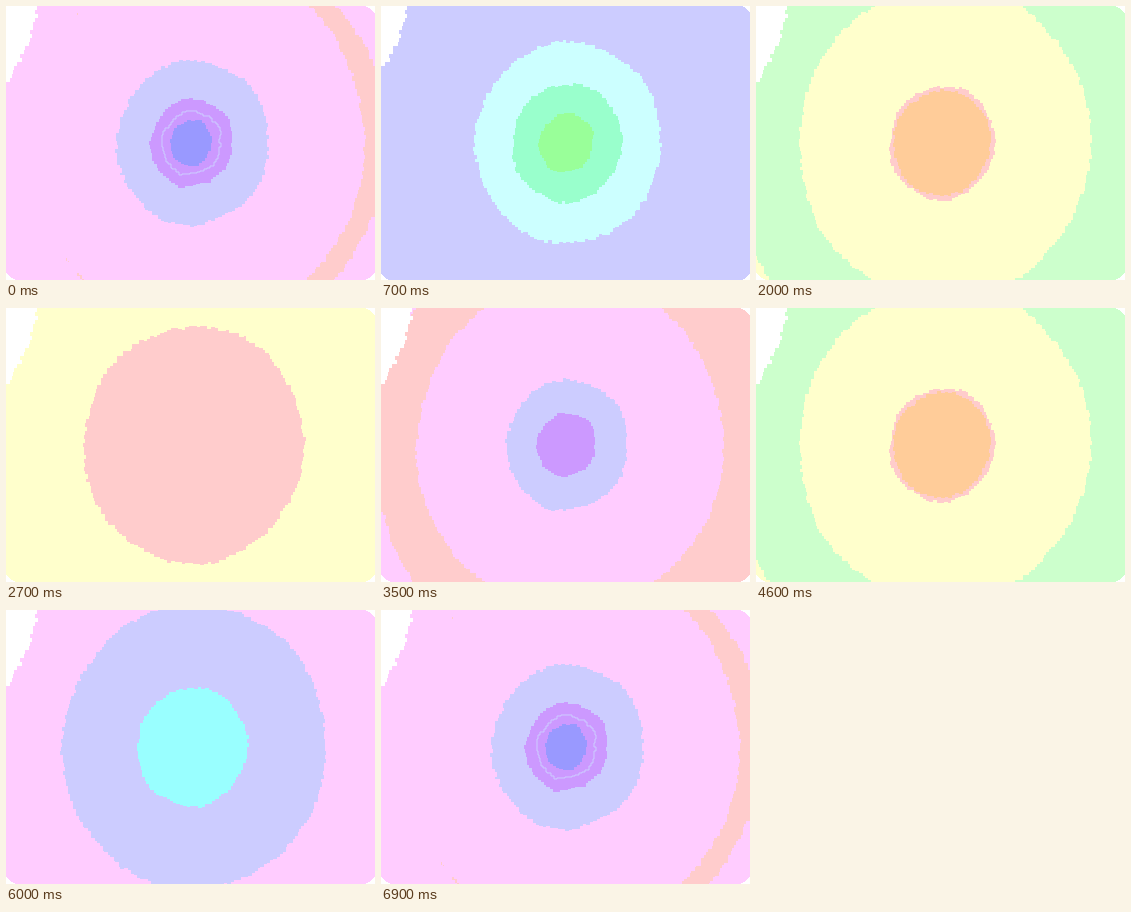
These frames come from a looping animation (369x274 px, 7 s). An HTML page with a canvas:

```html
<!DOCTYPE html>
<html>
<head>
<meta charset="utf-8">
<style>
html, body { margin: 0; width: 100%; height: 100%; overflow: hidden; background: #fff; }
canvas { display: block; width: 369px; height: 274px; }
</style>
</head>
<body>
<canvas id="stage" width="369" height="274"></canvas>
<script>
const W = 369, H = 274, LOOP = 7000, STEP = 100;
const REACH = 110;      // hue span from the centre to the outermost ring
const PX_PER_DEG = 1.55;
const ctx = document.getElementById('stage').getContext('2d');

// time in ms, hue at the centre in degrees: eight turns per loop
const hueKeys = [[0, 221], [1400, 799], [2700, 1399], [3500, 1671],
                 [4600, 2156], [6000, 2705], [6900, 3101]];

const mod = (a, n) => ((a % n) + n) % n;
const clamp = (v, lo, hi) => Math.max(lo, Math.min(hi, v));
const rad = deg => deg * Math.PI / 180;
const hueGap = (a, b) => Math.abs(mod(a - b + 180, 360) - 180);
const noise = n => mod(Math.sin(n * 12.9898) * 43758.5453, 1) - .5;

// hue snapped to a fixed number of steps around the wheel
const swatch = (steps, light) => n => `hsl(${mod(n, steps) * 360 / steps} 100% ${light}%)`;
const pale = swatch(6, 90), vivid = swatch(12, 80);

function centreHue(t) {
  const i = Math.max(1, hueKeys.findIndex(k => k[0] >= t));
  const [t0, h0] = hueKeys[i - 1], [t1, h1] = hueKeys[i];
  return mod(h0 + (h1 - h0) * (t - t0) / (t1 - t0), 360);
}

// ragged ellipse outline built from whole-pixel stairs
function outline(r, seed, dx = 0) {
  const count = Math.max(20, Math.round(r * 1.7));
  const rough = Math.min(3.4, 1.4 + r * .025);
  ctx.beginPath();
  let lastY;
  for (let i = 0; i <= count; i++) {
    const n = i % count, a = n / count * Math.PI * 2;
    const rr = r + noise(n + seed * 7.3) * rough + Math.sin(a * 5 + seed) * .8;
    const x = Math.round(184.5 + r * .03 + dx + rr * Math.cos(a));
    const y = Math.round(137 + rr * 1.08 * Math.sin(a));
    if (i) ctx.lineTo(x, lastY);
    ctx.lineTo(x, y);
    lastY = y;
  }
}

function disc(r, color, seed, dx) {
  outline(r, seed, dx);
  ctx.fillStyle = color;
  ctx.fill();
}

// past the outermost ring the hue turns back, a little right of centre
function drawRings(hue) {
  const span = n => 60 * n - 30 - hue;
  const top = Math.round((hue + REACH) / 60);
  ctx.fillStyle = pale(top - 1);
  ctx.fillRect(0, 0, W, H);
  disc(178 + (REACH - 1 - span(top)) * 3.5, pale(top), 3, 14);
  for (let n = top; span(n) > 12; n--) disc(span(n) * PX_PER_DEG, pale(n - 1), n);
}

// the core fades out around blue-violet, its hue drifts against the rings
function drawCore(hue) {
  const size = Math.min(55, (hueGap(hue, 285) - 28) * 1.13);
  if (size < 8) return;
  const base = hue + 45 * Math.cos(rad(hue - 297));
  const slope = Math.min(1.1, .2 + 1.5 * Math.abs(Math.sin(rad(hue - 175))));
  const radius = n => (30 * n - 15 - base) / slope;
  let n = Math.round((base + slope * size) / 30);
  disc(size, vivid(n), n + 2);
  for (; radius(n) > 10; n--) disc(radius(n), vivid(n - 1), n + 5);
  if (hueGap(hue, 221) < 6) {
    outline(size * .72, 4);
    ctx.strokeStyle = pale(4);
    ctx.stroke();
  }
}

// white corners: a frayed one at top left, small cuts elsewhere
function drawCorners(scale) {
  ctx.fillStyle = '#fff';
  const depth = 70 * scale, cut = 8 * scale;
  for (let y = 0; y < depth; y += 4) {
    const u = y / depth;
    ctx.fillRect(0, y, Math.round(28 * scale * (1 - u ** 1.6) + noise(y + 3) * 5), 4);
  }
  for (let i = 0; i < cut; i++) {
    const w = Math.round((cut - i) ** 2 / cut);
    ctx.fillRect(W - w, i, w, 1);
    ctx.fillRect(W - w, H - 1 - i, w, 1);
    ctx.fillRect(0, H - 1 - i, w, 1);
  }
}

function draw(t) {
  const hue = centreHue(t);
  drawRings(hue);
  drawCore(hue);
  drawCorners(clamp(hueGap(hue, 79) / 50 - .5, 0, 1.1));
}

const start = performance.now();
let shown = -1;
function tick() {
  const t = Math.floor(mod(performance.now() - start, LOOP) / STEP) * STEP;
  if (t !== shown) draw(shown = t);
  requestAnimationFrame(tick);
}
tick();
</script>
</body>
</html>
```
